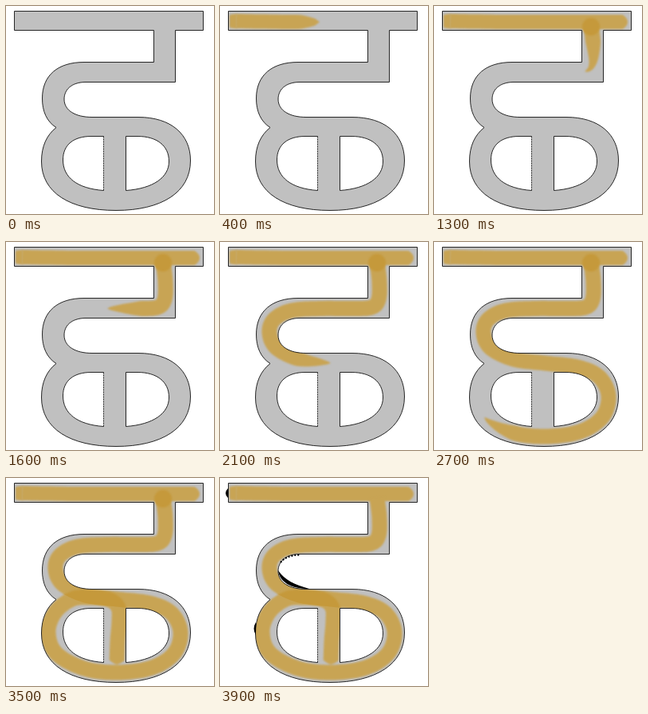
An HTML page with a canvas for the animation above (4000 ms loop, 261x261 px).

```html
<!DOCTYPE html>
<html>
<head>
<meta charset="utf-8">
<style>
html, body { margin: 0; width: 100%; height: 100%; overflow: hidden; background: #fff; }
canvas { display: block; }
</style>
</head>
<body>
<canvas id="stage" width="261" height="261"></canvas>
<script>
const ctx = document.getElementById('stage').getContext('2d');
const LOOP = 4000, STEP = 100;
const GRAY = '#c0c0c0', PAINT = '#c8a454', OVERLAP = '#c5993b';

const body = new Path2D(`M10.5 6.5H247.5V30.5H212.5V95.5H99C82 96 73 105 73 117
  C73 131 87 139.5 108 139.5H166C207 139.5 231.5 161 231.5 194
  C231.5 234 195 256.5 138 256.5C80 256.5 44.5 234 44.5 195
  C44.5 176 51 162 63 152.5C51 145 45.5 132 45.5 116C45.5 87 65 70.5 98 70.5
  H185.5V30.5H10.5Z`);
const leftHole = new Path2D('M122.5 163.5H107C85 163.5 71.5 174 71.5 193C71.5 215 89 229 122.5 231.5');
const rightHole = new Path2D('M150.5 163.5H165C189 163.5 204.5 175 204.5 195C204.5 215 185 229 150.5 231.5Z');
const letterShape = new Path2D(body);
letterShape.addPath(leftHole);
letterShape.addPath(rightHole);

// Smooth curve through the points, sampled with running length
function makeCurve(points) {
  const samples = [], marks = [];
  let length = 0;
  const add = (x, y) => {
    const last = samples[samples.length - 1];
    if (last) length += Math.hypot(x - last.x, y - last.y);
    samples.push({ x, y, d: length });
  };
  const at = i => points[Math.max(0, Math.min(points.length - 1, i))];
  add(...points[0]);
  marks.push(0);
  for (let i = 0; i < points.length - 1; i++) {
    const [a, b, c, e] = [at(i - 1), at(i), at(i + 1), at(i + 2)];
    for (let k = 1; k <= 12; k++) {
      const u = k / 12;
      const mix = n => 0.5 * (2 * b[n] + (c[n] - a[n]) * u
        + (2 * a[n] - 5 * b[n] + 4 * c[n] - e[n]) * u * u
        + (3 * b[n] - a[n] - 3 * c[n] + e[n]) * u * u * u);
      add(mix(0), mix(1));
    }
    marks.push(length);
  }
  return { samples, marks, length };
}

const bar = makeCurve([[20, 19], [90, 20], [160, 20], [230, 20], [243, 20]]);
const letter = makeCurve([
  [197, 25], [200, 50], [199, 72], [190, 82], [165, 83.5], [127, 83.5],
  [90, 86], [68, 97], [62, 114], [71, 133], [100, 147], [139, 152],
  [180, 157], [207, 169], [219, 193], [211, 220], [183, 238], [140, 244],
  [98, 239], [63, 220], [53, 193], [62, 168], [83, 152], [105, 150],
  [130, 153], [141, 163], [142, 180], [140, 205], [139, 234]
]);
// Time and the curve point the brush tip has reached
const barKeys = [[0, 0], [800, 3], [900, 4]];
const letterKeys = [[1000, 0], [1600, 5], [2100, 11], [2700, 19], [3100, 26], [3400, 28]];

function reach(curve, keys, t) {
  if (t <= keys[0][0]) return 0;
  for (let i = 1; i < keys.length; i++) {
    const [t0, p0] = keys[i - 1], [t1, p1] = keys[i];
    if (t <= t1) {
      return curve.marks[p0] + (curve.marks[p1] - curve.marks[p0]) * (t - t0) / (t1 - t0);
    }
  }
  return curve.length;
}

function ribbon(curve, from, to, radius, taper, power) {
  const path = new Path2D(), left = [], right = [], s = curve.samples;
  const edge = (x, y, dx, dy, d) => {
    const n = Math.hypot(dx, dy) || 1;
    const w = radius * Math.min(1, Math.max(0, to - d) / taper) ** power;
    left.push([x - dy / n * w, y + dx / n * w]);
    right.push([x + dy / n * w, y - dx / n * w]);
  };
  for (let i = 0; i < s.length; i++) {
    if (s[i].d < from) continue;
    const a = s[Math.max(0, i - 1)], b = s[Math.min(s.length - 1, i + 1)];
    if (s[i].d > to) {
      const u = (to - a.d) / (s[i].d - a.d);
      edge(a.x + (s[i].x - a.x) * u, a.y + (s[i].y - a.y) * u, s[i].x - a.x, s[i].y - a.y, to);
      break;
    }
    edge(s[i].x, s[i].y, b.x - a.x, b.y - a.y, s[i].d);
  }
  left.concat(right.reverse()).forEach(p => path.lineTo(...p));
  path.closePath();
  return path;
}

function paint(path, color) {
  ctx.filter = 'blur(0.9px)';
  ctx.fillStyle = color;
  ctx.fill(path);
  ctx.filter = 'none';
}

function disc(x, y, r) {
  const path = new Path2D();
  path.arc(x, y, r, 0, 7);
  return path;
}

function drawOutline() {
  ctx.strokeStyle = '#111';
  ctx.lineWidth = 0.9;
  ctx.stroke(body);
  ctx.stroke(leftHole);
  ctx.stroke(rightHole);
  ctx.setLineDash([2, 1]);
  ctx.stroke(new Path2D('M122.5 163.5V231.5'));
  ctx.setLineDash([]);
}

function drawBrush(t) {
  const barTip = reach(bar, barKeys, t);
  const tip = reach(letter, letterKeys, t);
  if (barTip > 0) {
    paint(ribbon(bar, 0, barTip, 9, barTip < bar.length ? 25 : 6, 0.5), PAINT);
    paint(new Path2D('M12 12Q12 10 21 10V28Q12 28 12 26Z'), PAINT);
  }
  if (tip <= 0) return;

  const taper = tip < letter.length ? 42 : 5;
  const stroke = from => ribbon(letter, from, tip, 9.5, taper, 0.7);
  paint(stroke(0), PAINT);
  if (t < LOOP - STEP) paint(disc(197, 26, 11), OVERLAP);

  const second = letter.marks[20];
  if (tip > second) {
    ctx.save();
    ctx.clip(ribbon(letter, 0, letter.marks[13], 9.5, 1, 1));
    paint(stroke(second), OVERLAP);
    ctx.restore();
  }
}

function drawBlots() {
  ctx.fillStyle = '#000';
  ctx.fill(new Path2D('M73 116C75 131 89 139 112 139C94 134 81 128 73 116Z'));
  ctx.fill(new Path2D('M10 13Q4 19 10 25Z'));
  ctx.fill(new Path2D('M45 181Q40 189 45 197Z'));
  ctx.strokeStyle = '#000';
  ctx.lineWidth = 2;
  ctx.setLineDash([2, 2]);
  ctx.stroke(new Path2D('M76 106Q83 97 100 96.5'));
  ctx.setLineDash([]);
}

function frame(now) {
  const t = Math.floor(now % LOOP / STEP) * STEP;
  ctx.fillStyle = '#fff';
  ctx.fillRect(0, 0, 261, 261);
  ctx.fillStyle = GRAY;
  ctx.fill(letterShape, 'evenodd');
  ctx.save();
  ctx.clip(letterShape, 'evenodd');
  drawBrush(t);
  ctx.restore();
  drawOutline();
  if (t >= LOOP - STEP) drawBlots();
}

let start;
function tick(now) {
  start ??= now;
  frame(now - start);
  requestAnimationFrame(tick);
}
frame(0);
requestAnimationFrame(tick);
</script>
</body>
</html>
```
